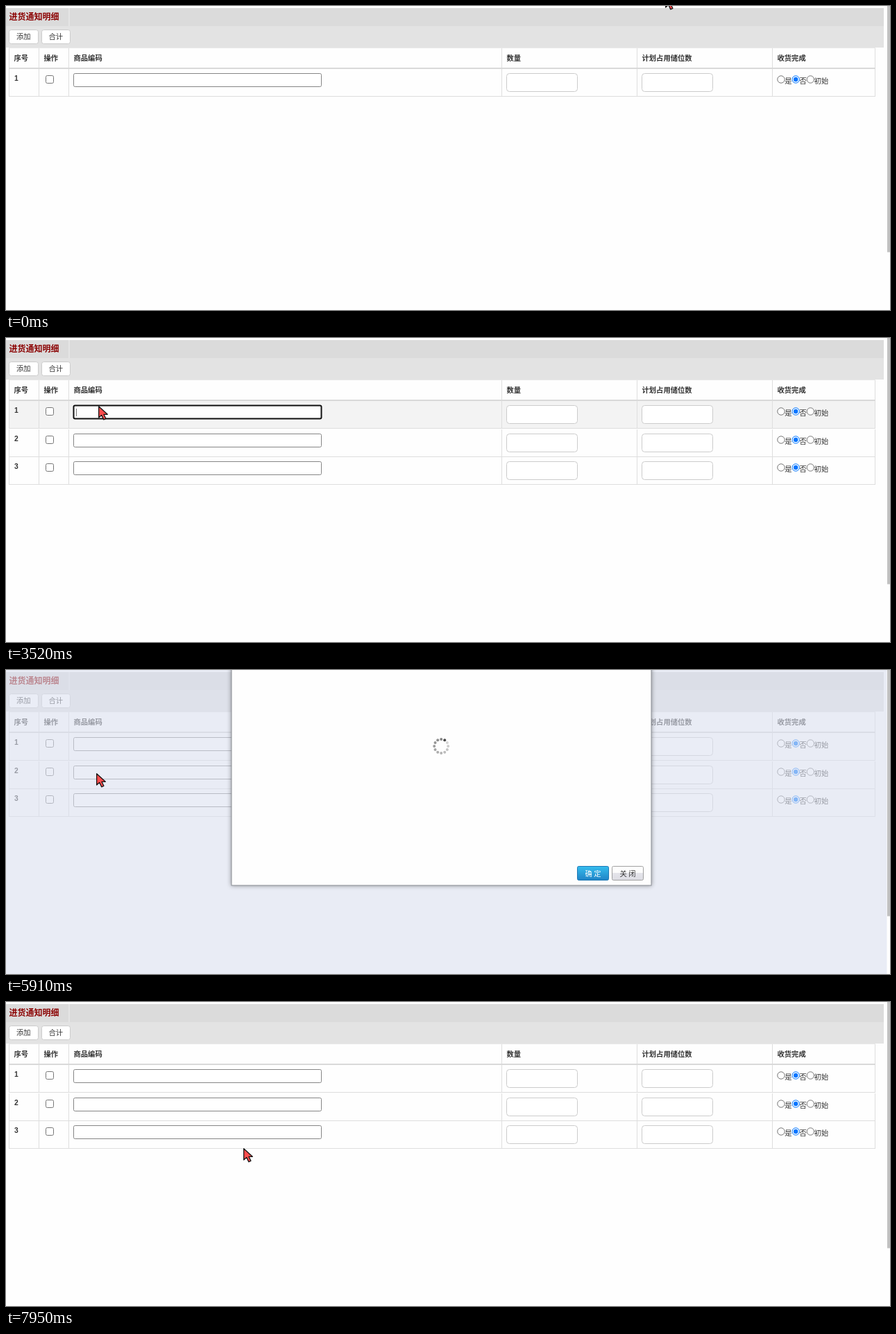
Animation, 1274 px wide and 439 px high, one loop 7990 ms. Source, as an HTML page:

```html
<!DOCTYPE html>
<html lang="zh-CN">
<head>
<meta charset="utf-8">
<title>进货通知明细</title>
<style>
html, body { margin: 0; width: 100%; height: 100%; overflow: hidden; background: #fefefe; }
svg { display: block; width: 1274px; height: 439px; }
text { font: 10.3px "Noto Sans CJK SC", "Noto Sans CJK", sans-serif; fill: #333; white-space: pre; }
.bold { font-weight: bold; }
.title { font-size: 12px; font-weight: bold; fill: #8b0000; }
.num { font: bold 10.3px "Liberation Sans", sans-serif; }
.grid text { font: 10px "Noto Sans", "Noto Sans CJK SC", "Noto Sans CJK", sans-serif; }
#dialog { filter: drop-shadow(0 0 3px rgba(0,0,0,.4)); }
</style>
</head>
<body>
<svg id="stage" viewBox="0 0 1274 439" xmlns="http://www.w3.org/2000/svg">
  <defs>
    <linearGradient id="blue" x2="0" y2="1"><stop stop-color="#35bdee"/><stop offset="1" stop-color="#2083c6"/></linearGradient>
    <linearGradient id="silver" x2="0" y2="1"><stop stop-color="#fff"/><stop offset=".48" stop-color="#fbfbfb"/><stop offset=".5" stop-color="#e4e4ea"/><stop offset="1" stop-color="#dddde4"/></linearGradient>
    <clipPath id="gridClip"><rect x="330" y="65" width="595" height="189"/></clipPath>
    <clipPath id="bodyClip"><rect x="330" y="97" width="585" height="147"/></clipPath>
  </defs>
  <g id="page"></g>
  <g id="overlay">
    <rect width="1269.5" height="439" fill="#dce2f1" opacity=".6"/>
    <g id="dialog"><rect x="325" y="-40" width="605" height="351" fill="#fefefe" stroke="#8b8f96"/></g>
    <g id="spinner"></g>
    <g id="content" class="grid"></g>
    <g id="actions"></g>
  </g>
  <path d="M1270 0h4v355.500h-4z" fill="#c1c1c1"/>
  <g id="cursor" fill="#ff4d4d" stroke="#151515" stroke-width="1.300" stroke-linejoin="round">
    <path id="arrow" d="M.7.7V17l4-3.600 3 6.400 3.200-1.500-3-6h5.400z"/>
    <path id="hand" d="M4 12.500V2.400a1.700 1.700 0 0 1 3.400 0V8l5.300 1.200q2.900.8 2.600 3.800l-.9 5.500-1.200 3H6.600L1 14.500q-.3-2 1.500-2z"/>
  </g>
</svg>
<script>
const $ = id => document.getElementById(id);
const add = (id, markup) => $(id).insertAdjacentHTML('beforeend', markup);
const show = (id, on) => $(id).setAttribute('visibility', on ? 'inherit' : 'hidden');
const rect = (x, y, w, h, fill, stroke = 'none', r = 0, extra = '') =>
  `<rect x="${x}" y="${y}" width="${w}" height="${h}" rx="${r}" fill="${fill}" stroke="${stroke}" ${extra}/>`;
const text = (x, y, s, cls = '', extra = '') => `<text x="${x}" y="${y}" class="${cls}" ${extra}>${s}</text>`;
const path = (d, stroke, fill = 'none', width = 1) =>
  `<path d="${d}" stroke="${stroke}" fill="${fill}" stroke-width="${width}"/>`;
const MID = 'text-anchor="middle"';

const LINE = '#dedede', ROW_TOP = 90, ROW_H = 40.6;
const COLS = [4.5, 47.5, 90.5, 714.5, 909.5, 1104.5, 1252.5];

function buildPage() {
  const heads = ['序号', '操作', '商品编码', '数量', '计划占用储位数', '收货完成'];
  add('page',
    rect(0, 3, 1265, 26, '#dbdbdb') + rect(0, 29, 1265, 31, '#e3e3e3') +
    path('M91 3V29', '#efefef') + text(4.5, 20, '进货通知明细', 'title') +
    rect(4.5, 34.5, 42, 20, '#fff', '#ccc', 3, 'id="addButton"') + text(15, 48.3, '添加') +
    rect(51.5, 34.5, 41, 20, '#fff', '#ccc', 3) + text(61.5, 48.3, '合计') +
    COLS.map(x => path(`M${x} 60V90`, LINE)).join('') +
    path('M4 60.500H1253', '#e8e8e8') + path('M4 90H1253', '#d9d9d9', 'none', 2) +
    heads.map((s, i) => text(COLS[i] + 7, 78.7, s, 'bold')).join(''));
  for (let i = 0; i < 3; i++) add('page', tableRow(i));
}

function tableRow(i) {
  const dy = Math.round(i * ROW_H);
  const radios = ['是', '否', '初始'].map((s, k) => {
    const x = 1117 + 21.2 * k, on = k === 1;
    return `<circle cx="${x}" cy="106" r="5.200" fill="#fff" stroke="${on ? '#0075ff' : '#767676'}"/>` +
      (on ? `<circle cx="${x}" cy="106" r="3.200" fill="#0075ff"/>` : '') + text(x + 5.3, 111.6, s);
  }).join('');
  return `<g id="row${i}" transform="translate(0 ${dy})">` +
    rect(5, 91, 1247, 39, 'none', 'none', 0, `id="back${i}"`) +
    COLS.map(x => path(`M${x} 91V130.500`, LINE)).join('') + path('M4 130.500H1253', LINE) +
    text(12, 108, i + 1, 'num') + rect(57.5, 100.5, 11, 11, '#fff', '#767676', 2) +
    rect(97.5, 97.5, 357, 19, '#fff', '#858585', 2, `id="input${i}"`) +
    path('M101.500 102V113', '#777').replace('<path', `<path id="caret${i}"`) +
    rect(721.5, 97.5, 102, 26, '#fff', '#ccc', 4) + rect(916.5, 97.5, 102, 26, '#fff', '#ccc', 4) +
    radios + '</g>';
}

function buildDialog() {
  for (let k = 0; k < 12; k++) {
    const a = k * Math.PI / 6;
    add('spinner', `<circle cx="${627.2 + 10 * Math.sin(a)}" cy="${110 - 10 * Math.cos(a)}" r="2"/>`);
  }
  add('actions',
    rect(823.5, 283.5, 45, 20, 'url(#blue)', '#1c77b5', 2, 'id="okButton"') +
    text(846, 297.5, '确 定', '', MID + ' style="fill:#fff"') +
    rect(873.5, 283.5, 45, 20, 'url(#silver)', '#a0a0a0', 2) + text(896, 297.5, '关 闭', '', MID));

  const field = (x, y) => rect(x, y, 101, 25, '#fff', '#d8d8d8', 3);
  add('content',
    [409.5, 588.5, 767.5].map(x => field(x, -20.5)).join('') + field(409.5, 5.5) + field(588.5, 5.5) +
    text(378, 23, '规格：') + text(557, 23, '品牌：') +
    rect(832.5, 35.5, 43, 21, '#fefefe', '#ddd', 2) + text(852.5, 50, '查询') +
    rect(877.5, 35.5, 43, 21, '#fefefe', '#ddd', 2) + text(897, 50, '重置') +
    path('M843.500 47.500L847.500 51.500', '#c58a4d', 'none', 2.4) +
    '<circle cx="840.500" cy="44.500" r="3.700" fill="#c9e5fb" stroke="#7ba6cf" stroke-width="1.500"/>' +
    path('M882 45q1-4 6-3.500l2-1.500 1 5h-5M892 47q-1 4-6 3.500l-2 1.500-1-5h5', '#4f9e57', '#a8d6a5', 1.3) +
    path('M330 62.500H925', '#ddd'));
  add('content', gridHead() + gridBody() + pager());
}

const GRID_COLS = [351.5, 417.5, 486.5, 555.5, 793.5, 837.5, 880.5];
const checkbox = y => rect(357, y - 5.5, 12, 12, '#fff', '#767676', 2);

function gridHead() {
  const heads = [[395, '货主'], [451, '商品'], [519, 'sku'], [673, '商品名'], [814, '单位'], [857, '温层'], [929, '条码']];
  return '<g clip-path="url(#gridClip)">' + rect(330, 65.5, 595, 31, '#fafafa') +
    rect(375, 66, 111, 30, '#f3f3f3') +
    path('M330 65.500H925M330 96.500H925', LINE) +
    GRID_COLS.map(x => path(`M${x} 66V97`, LINE)).join('') + checkbox(80.5) +
    heads.map(([x, s]) => text(x, 85, s, '', MID)).join('') + '</g>';
}

function gridBody() {
  const rows = [
    ['X00001', '20222', '20222-蔗糖-斤', '斤', '恒温', ''],
    ['001', '123456789', '123456789-小蓝管-支', '支', '常温', '123456789'],
    ['710500', '0000', '0000-橙波气泡-箱', '箱', '恒温', ''],
    ['1234', '001', '001-羽绒服-个', '个', '常温', ''],
    ['001', '84452', '84452-65468-条', '条', '电缆', '']];
  const xs = [378.5, 421.5, 559, 797.5, 841, 884];
  const cells = rows.map((row, i) => {
    const y = 112.3 + 31.5 * i;
    return rect(330, y - 15.3, 585, 31, i % 2 ? '#fafafa' : '#fff') +
      path(`M330 ${Math.round(y + 15.7) + .5}H915`, '#e2e2e2') +
      text(340, y + 4, i + 1, '', MID) + checkbox(y) + row.map((s, k) => text(xs[k], y + 4, s)).join('');
  }).join('');
  return '<g id="rows"><g clip-path="url(#bodyClip)">' + cells +
    GRID_COLS.map(x => path(`M${x} 97V244`, LINE)).join('') + '</g>' +
    rect(375, 244, 540, 9, '#fafafa') + rect(385, 244, 344.5, 9, '#c1c1c1') +
    rect(915, 97, 10, 147, '#fafafa') + rect(916, 107, 8.5, 83.5, '#c1c1c1') + rect(915, 243.5, 10, 10, '#dcdcdc') +
    path('M918 104l2.300-3 2.300 3zM382 246.200l-3 2.300 3 2.300z', 'none', '#999') +
    path('M918 236l2.300 3 2.300-3zM908 246.200l3 2.300-3 2.300z', 'none', '#333') + '</g>';
}

function pager() {
  const button = x => rect(x, 258.5, 27, 18, '#fcfcfc', '#e3e3e3', 3);
  const left = x => `M${x} 262v8l-5-4z`, right = x => `M${x} 262v8l5-4z`;
  return path('M330 253.500H925M330 280.500H925', '#ddd') + path('M375.500 257V278M444.500 257V278M491.500 257V278M559.500 257V278', '#e3e3e3') +
    rect(335.5, 259.5, 33, 15, '#fff', '#ddd', 2) + text(340, 271, '10') + path('M357.500 265.500l3 3 3-3', '#222', 'none', 1.5) +
    [377.5, 411.5, 493.5, 526.5, 563.5].map(button).join('') +
    path(left(393) + left(425) + right(503) + right(535) + 'M386 262h1.800v8h-1.800zM540.500 262h1.800v8h-1.800z', 'none', '#8bc1ee') +
    path('M572 262.800a4 4 0 1 0 4.500 0', '#3593d8', 'none', 1.8) + path('M570.500 261l4.500.2-2.500 4z', 'none', '#3593d8') +
    rect(453.5, 259.5, 20, 16, '#fff', '#ddd', 2) + text(456, 271, '1') + text(475.5, 271, '/1') +
    text(920, 271, '1-7共 7条', '', 'text-anchor="end"');
}

// Pointer path: time, x, y
const PATH = [
  [0, 950, -15], [40, 950, -15], [420, 560, 70], [760, 195, 141], [800, 200, 142],
  [1380, 200, 142], [1640, 95, 85], [1880, 25, 47], [2560, 25, 47], [2600, 21, 45],
  [2860, 21, 45], [3000, 45, 14], [3200, 95, 52], [3440, 133, 98],
  [3640, 133, 98], [3900, 560, 40], [4120, 915, -25], [5150, 915, -25],
  [5350, 520, 60], [5600, 130, 149], [6630, 130, 149], [6750, 62, 140], [6990, 264, 58.5],
  [7200, 640, 180], [7390, 900, 273], [7470, 893, 290], [7550, 893, 290],
  [7630, 888, 256], [7750, 587, 118], [7910, 342, 211], [7990, 342, 211]];
const LOOP = 7990, DIALOGS = [[3560, 5010], [5850, 7510]];
const FOCUS = [[0, 3480, 3560], [1, 5790, 5850]];

function pointerAt(t) {
  const i = PATH.findIndex(p => p[0] > t);
  const [t0, x0, y0] = PATH[i - 1], [t1, x1, y1] = PATH[i];
  const k = (t - t0) / (t1 - t0);
  return [x0 + (x1 - x0) * k, y0 + (y1 - y0) * k];
}

function render(t) {
  const [x, y] = pointerAt(t);
  const dialog = DIALOGS.find(([a, b]) => t >= a && t < b);
  const rowCount = t < 2150 ? 1 : t < 2760 ? 2 : 3;
  const onAdd = !dialog && x < 44 && y > 32 && y < 54;
  const onClose = dialog && x > 870 && y > 283;

  for (let i = 0; i < 3; i++) {
    const top = ROW_TOP + i * ROW_H;
    const hover = !dialog && y > top && y < Math.min(top + ROW_H, 211) && x < 1253;
    const focus = FOCUS.some(([row, a, b]) => row === i && t >= a && t < b);
    show('row' + i, i < rowCount);
    show('caret' + i, focus);
    $('back' + i).setAttribute('fill', hover ? '#f3f3f3' : 'none');
    $('input' + i).setAttribute('stroke', focus ? '#101010' : '#858585');
    $('input' + i).setAttribute('stroke-width', focus ? 2 : 1);
  }
  $('addButton').setAttribute('fill', onAdd ? '#e4e4e4' : '#fff');
  $('addButton').setAttribute('stroke', onAdd ? '#b5b5b5' : '#ccc');

  show('overlay', dialog);
  if (dialog) {
    const age = t - dialog[0], loaded = age >= 440;
    show('spinner', !loaded);
    show('content', loaded);
    show('rows', age >= 600);
    $('okButton').setAttribute('stroke-width', loaded ? 1.8 : 1);
    const head = 1 + Math.floor(age / 80);
    [...$('spinner').children].forEach((dot, k) => {
      const lag = ((head - k) % 12 + 12) % 12;
      const grey = lag ? 125 + lag * 8 : 70;
      dot.setAttribute('fill', `rgb(${grey},${grey},${grey})`);
    });
  }
  show('hand', onAdd || onClose);
  show('arrow', !(onAdd || onClose));
  $('cursor').setAttribute('transform', `translate(${x} ${y})`);
}

buildPage();
buildDialog();
const start = performance.now();
(function tick() {
  render((performance.now() - start) % LOOP);
  requestAnimationFrame(tick);
})();
</script>
</body>
</html>
```
